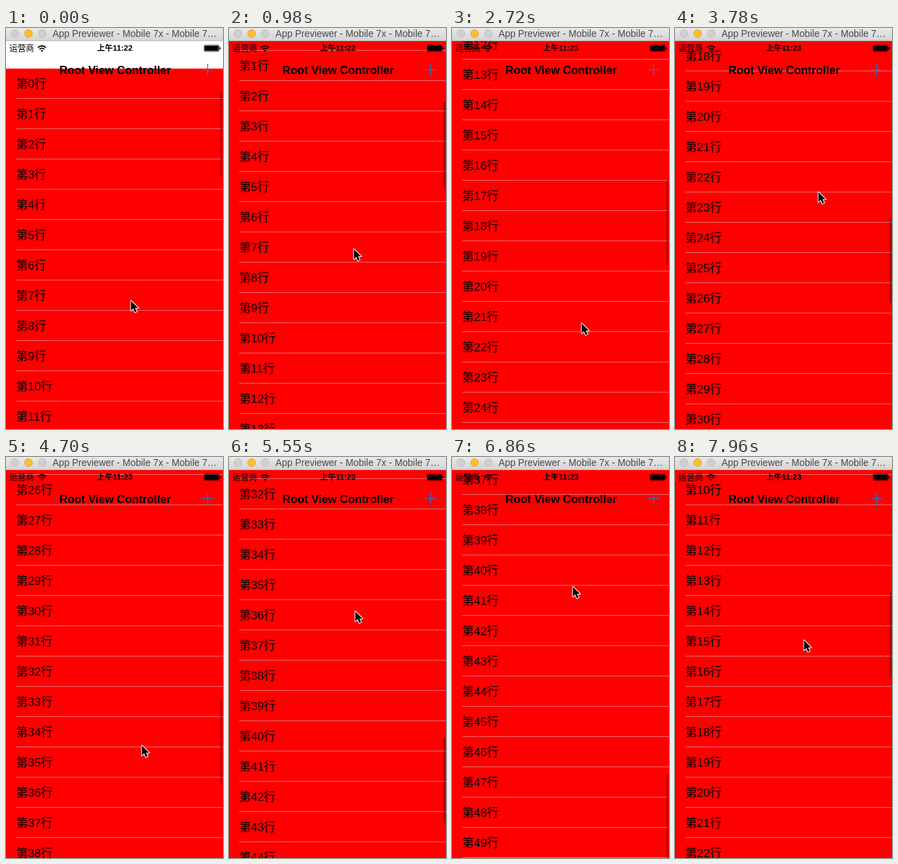
Animation, 317 px wide and 583 px high, one loop 8 s. Source, as an HTML page with a canvas:

```html
<!DOCTYPE html>
<html lang="zh">
<head>
<meta charset="utf-8">
<style>
  html, body { margin: 0; width: 100%; height: 100%; overflow: hidden; background: #fff; }
  canvas { display: block; }
</style>
</head>
<body>
<canvas id="stage" width="317" height="583"></canvas>
<script>
const W = 317, H = 583, LOOP = 8000;
const ROWS = 50, ROW_HEIGHT = 44, LIST_TOP = 59, CLOCK_TICK = 1750;
const FONT = '"Liberation Sans", "Noto Sans CJK SC", "Noto Sans CJK", sans-serif';
const ctx = document.getElementById('stage').getContext('2d');

// [time, value] keys
const scrollAt = curve([[0, 0], [980, 70], [1700, 335], [2720, 585], [3780, 832], [4650, 1160],
  [5550, 1435], [5940, 1640], [6250, 1715], [6860, 1676], [7200, 1540], [7960, 473]]);
const cursorX = curve([[0, 182], [980, 182], [2720, 189], [3780, 209], [5550, 184], [6860, 176], [7960, 188]]);
const cursorY = curve([[0, 396], [980, 321], [1350, 260], [2400, 438], [2720, 429], [3780, 238],
  [4600, 425], [5550, 224], [6860, 188], [7960, 266]]);

// Smooth interpolation that never overshoots its keys
function curve(keys) {
  const secant = keys.slice(1).map(([t, v], i) => (v - keys[i][1]) / (t - keys[i][0]));
  const slope = keys.map((_, i) => {
    const a = secant[i - 1] ?? secant[i], b = secant[i] ?? a;
    return a * b > 0 ? 2 * a * b / (a + b) : 0;
  });
  return time => {
    let i = 0;
    while (i < keys.length - 2 && time >= keys[i + 1][0]) i++;
    const [t0, v0] = keys[i], [t1, v1] = keys[i + 1], d = t1 - t0;
    const u = Math.min(1, (time - t0) / d), w = 1 - u;
    return v0 * (1 + 2 * u) * w * w + v1 * u * u * (3 - 2 * u)
      + d * u * w * (slope[i] * w - slope[i + 1] * u);
  };
}

function rect(x, y, w, h, color) {
  ctx.fillStyle = color;
  ctx.fillRect(x, y, w, h);
}

function rounded(x, y, w, h, r, color) {
  ctx.fillStyle = color;
  ctx.beginPath();
  ctx.roundRect(x, y, w, h, r);
  ctx.fill();
}

function text(string, x, y, size, color = '#000', weight = 'normal') {
  ctx.font = `${weight} ${size}px ${FONT}`;
  ctx.fillStyle = color;
  ctx.fillText(string, x, y);
}

function drawList(scroll) {
  const top = LIST_TOP - scroll;
  rect(0, top, W, ROWS * ROW_HEIGHT, '#f00');
  for (let i = 0; i < ROWS; i++) {
    const y = top + i * ROW_HEIGHT;
    if (y < -ROW_HEIGHT || y > H) continue;
    text(`第${i}行`, 15, y + 28, 17, '#000', 300);
    rect(15, y + 43, W - 15, 1, '#e8696b');
  }
}

function drawStatusBar(time) {
  text('运营商', 5, 34, 12, '#000', 300);
  ctx.save();
  ctx.beginPath();
  ctx.moveTo(52.5, 35);
  ctx.arc(52.5, 35, 11, -Math.PI * 0.73, -Math.PI * 0.27);
  ctx.clip();
  ctx.strokeStyle = '#000';
  ctx.lineWidth = 1.8;
  for (const r of [1, 4.6, 8]) {
    ctx.beginPath();
    ctx.arc(52.5, 34, r, Math.PI, 0);
    ctx.stroke();
  }
  ctx.restore();
  text(time < CLOCK_TICK ? '上午11:22' : '上午11:23', 133, 33, 11.5, '#000', 'bold');
  ctx.strokeStyle = '#000';
  ctx.lineWidth = 0.7;
  ctx.beginPath();
  ctx.roundRect(289.4, 24.9, 22, 9.2, 1.8);
  ctx.stroke();
  rounded(290.2, 25.7, 20.4, 7.6, 1, '#000');
  rounded(312, 28, 1.5, 3, 1, '#000');
}

function drawNavigation() {
  text('Root View Controller', 78, 67, 16.5, '#000', 'bold');
  rect(286, 60, 17, 1.2, '#1778e0');
  rect(294, 52, 1.2, 17, '#1778e0');
}

function drawTitleBar() {
  const shade = ctx.createLinearGradient(0, 0, 0, 19);
  shade.addColorStop(0, '#e9e9e9');
  shade.addColorStop(1, '#d3d3d3');
  rect(0, 0, W, 19, shade);
  rect(0, 18, W, 1, '#bdbdbd');
  [['#d0d0d0', '#b9b9b9'], ['#fdbe2f', '#dfa023'], ['#d0d0d0', '#b9b9b9']].forEach(([fill, edge], i) => {
    ctx.beginPath();
    ctx.arc(13 + 20 * i, 8, 5.6, 0, Math.PI * 2);
    ctx.fillStyle = fill;
    ctx.fill();
    ctx.strokeStyle = edge;
    ctx.lineWidth = 0.8;
    ctx.stroke();
  });
  text('App Previewer - Mobile 7x - Mobile 7…', 68, 13, 13.85, '#484848');
}

const arrow = new Path2D('M.5 .5V15L3.8 11.8L6.3 17.3L8.9 16.2L6.5 10.9H11Z');
function drawCursor(x, y) {
  ctx.save();
  ctx.translate(x, y);
  ctx.lineJoin = 'round';
  ctx.lineWidth = 2;
  ctx.strokeStyle = '#fff';
  ctx.stroke(arrow);
  ctx.fillStyle = '#000';
  ctx.fill(arrow);
  ctx.restore();
}

function draw(now) {
  const time = now % LOOP;
  const scroll = Math.round(scrollAt(time));
  rect(0, 0, W, H, '#fff');
  drawList(scroll);
  drawStatusBar(time);
  drawNavigation();
  rounded(313.5, 92 + scroll * 0.2205, 2.5, 124, 1.25, 'rgba(0,0,0,.36)');
  drawTitleBar();
  drawCursor(Math.round(cursorX(time)), Math.round(cursorY(time)));
}

const start = performance.now();
function tick() {
  draw(performance.now() - start);
  requestAnimationFrame(tick);
}
tick();
</script>
</body>
</html>
```
